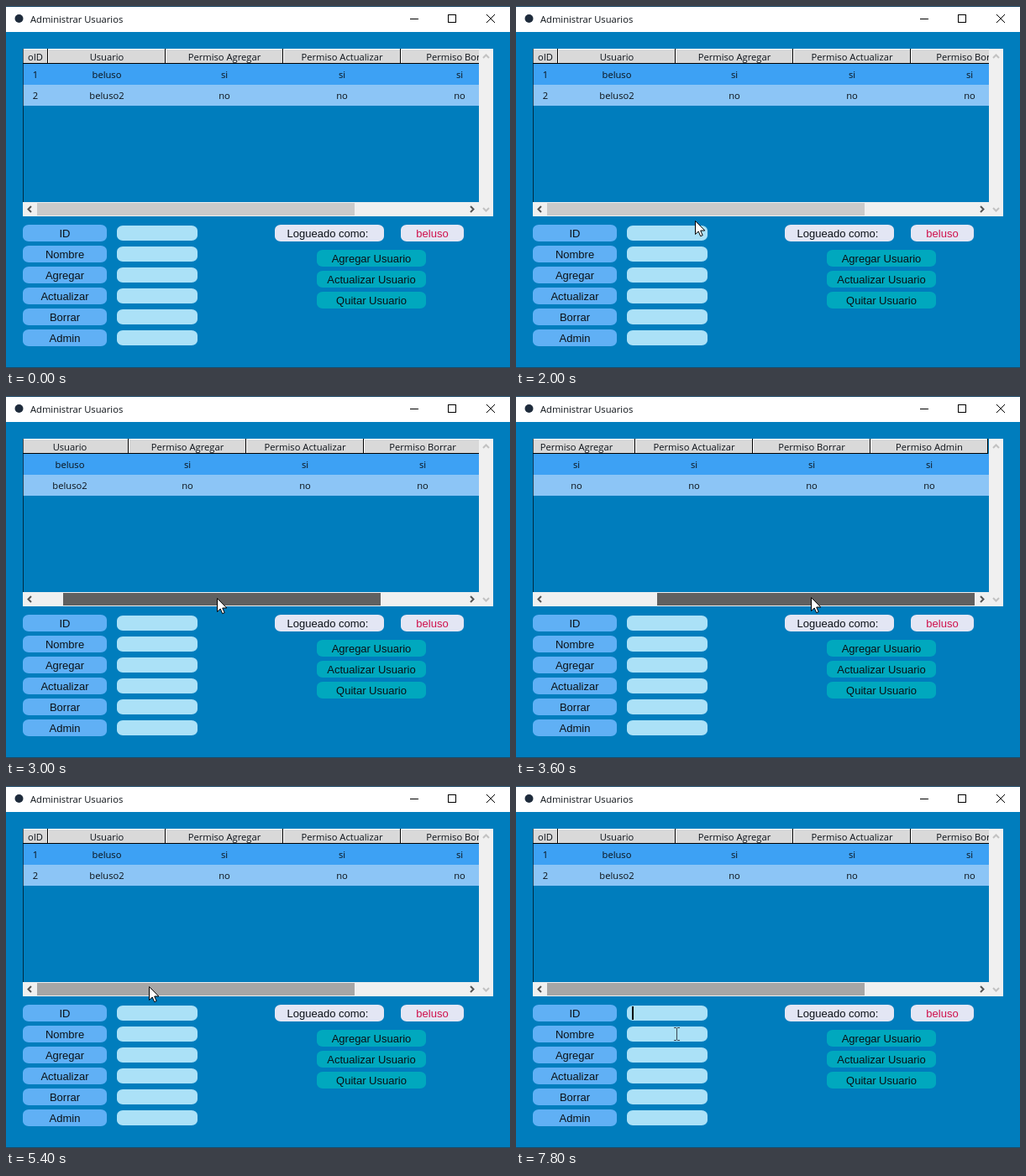
An HTML page that plays this animation: 600x432 px, repeating every 8 s.

```html
<!DOCTYPE html>
<html lang="es">
<head>
<meta charset="utf-8">
<title>Administrar Usuarios</title>
<style>
  html, body { margin: 0; width: 100%; height: 100%; overflow: hidden; background: #007dbd; }
  svg { display: block; width: 100vw; height: 100vh; }
  text { font: 13px "Liberation Sans", Arial, sans-serif; text-anchor: middle; fill: #0b1016; }
  .ui { font: 11.2px "Open Sans", "Noto Sans", sans-serif; }
  .line { fill: none; stroke: #000; }
  .crisp { shape-rendering: crispEdges; }
  .arrow { fill: none; stroke: #555; stroke-width: 2; }
  .off { stroke: #c2c2c2; }

  #pointer, #columns, #thumb, #arrow, #beam, #caret { animation: 8s infinite; }
  #pointer { animation-name: point; }
  #columns { animation-name: scroll; }
  #thumb { animation-name: drag, shade; animation-timing-function: ease, step-end; }
  #arrow, #beam, #caret { animation-timing-function: step-end; }
  #arrow { animation-name: arrow; }
  #beam { animation-name: beam; }
  #caret { animation-name: blink; }

  /* Motion advances in 200 ms steps (2.5% of the loop). */
  @keyframes point {
    0% { transform: translate(160px, 440px); animation-timing-function: step-end; }
    15% { transform: translate(160px, 440px); animation-timing-function: steps(4); }
    25% { transform: translate(213px, 256px); animation-timing-function: steps(2); }
    30% { transform: translate(220px, 242px); animation-timing-function: steps(3); }
    37.5% { transform: translate(251px, 241px); animation-timing-function: steps(3); }
    45% { transform: translate(351px, 240px); animation-timing-function: steps(4); }
    55% { transform: translate(242px, 236px); animation-timing-function: steps(2); }
    60% { transform: translate(200px, 238px); animation-timing-function: steps(3); }
    67.5% { transform: translate(170px, 239px); animation-timing-function: step-end; }
    70% { transform: translate(170px, 239px); animation-timing-function: steps(4); }
    80% { transform: translate(187px, 272px); animation-timing-function: steps(2); }
    85% { transform: translate(187px, 278px); animation-timing-function: step-end; }
    92.5% { transform: translate(187px, 278px); animation-timing-function: steps(2); }
    97.5%, 100% { transform: translate(191px, 296px); }
  }
  @keyframes scroll {
    0% { transform: none; animation-timing-function: step-end; }
    30% { transform: translateX(0); animation-timing-function: steps(3); }
    37.5% { transform: translateX(-44px); animation-timing-function: steps(3); }
    45% { transform: translateX(-188px); animation-timing-function: steps(4); }
    55% { transform: translateX(-36px); animation-timing-function: steps(2); }
    60%, 100% { transform: translateX(0); }
  }
  @keyframes drag {
    0% { transform: none; animation-timing-function: step-end; }
    30% { transform: translateX(0); animation-timing-function: steps(3); }
    37.5% { transform: translateX(31px); animation-timing-function: steps(3); }
    45% { transform: translateX(131px); animation-timing-function: steps(4); }
    55% { transform: translateX(27px); animation-timing-function: steps(2); }
    60%, 100% { transform: translateX(0); }
  }
  @keyframes shade {
    0% { fill: #cacaca; animation-timing-function: step-end; }
    27.5% { fill: #a6a6a6; animation-timing-function: step-end; }
    30% { fill: #606060; animation-timing-function: step-end; }
    62.5%, 100% { fill: #a6a6a6; }
  }
  @keyframes arrow { 0% { opacity: 1; } 77.5%, 100% { opacity: 0; } }
  @keyframes beam { 0% { opacity: 0; } 77.5%, 100% { opacity: 1; } }
  @keyframes blink {
    0% { opacity: 0; }
    80% { opacity: 1; }
    90% { opacity: 0; }
    92.5%, 100% { opacity: 1; }
  }
</style>
</head>
<body>
<svg viewBox="0 0 600 432">
  <clipPath id="view"><rect x="20" y="51" width="543" height="183"/></clipPath>

  <rect width="600" height="432" fill="#007dbd"/>
  <rect width="600" height="31" fill="#fff"/>
  <rect class="crisp" width="600" height="1" fill="#123f5f"/>
  <rect class="crisp" y="431" width="600" height="1" fill="#1c4a68"/>
  <circle cx="15.5" cy="15" r="5" fill="#1f2c3c"/>
  <text class="ui" x="29" y="20" style="text-anchor:start">Administrar Usuarios</text>
  <path class="line crisp" d="M481 15.5h10M526.5 10.5h9v9h-9z"/>
  <path class="line" d="M572 10l10 10m0-10l-10 10"/>

  <g clip-path="url(#view)">
    <rect x="20" y="69" width="543" height="25" fill="#3da1f4"/>
    <rect x="20" y="94" width="543" height="25" fill="#8cc5f6"/>
    <g id="columns"></g>
    <path class="line crisp" d="M20.5 51v183" opacity=".65"/>
  </g>

  <rect x="563" y="51" width="17" height="200" fill="#f0f0f0"/>
  <rect x="20" y="234" width="543" height="17" fill="#f0f0f0"/>
  <rect id="thumb" x="37" y="235" width="378" height="15"/>
  <path class="arrow" d="M30 239l-3.5 3.5 3.5 3.5M553 239l3.5 3.5-3.5 3.5"/>
  <path class="arrow off" d="M568 62l3.5-3.5 3.5 3.5M568 241l3.5 3.5 3.5-3.5"/>

  <g id="form"></g>
  <rect id="caret" class="crisp" x="138" y="263" width="2" height="16"/>

  <g id="pointer">
    <path id="arrow" d="M.5.5V16.5L4.2 13 6.7 18.7 9.2 17.6 6.7 12H11.8Z" fill="#fff" stroke="#000"/>
    <path id="beam" class="crisp" d="M-3 -7.5H0M1 -7.5H4M.5-7V7M-3 7.5H0M1 7.5H4" fill="none" stroke="#3b4650"/>
  </g>
</svg>
<script>
  const byId = id => document.getElementById(id);
  const text = (label, x, y, attrs = "") => `<text x="${x}" y="${y}" ${attrs}>${label}</text>`;
  const pill = (x, y, w, h, fill) =>
    `<rect x="${x}" y="${y}" width="${w}" height="${h}" rx="7" ry="6" fill="${fill}"/>`;
  const badge = (label, x, y, w, fill, attrs) =>
    pill(x, y, w, 20, fill) + text(label, x + w / 2, y + 15, attrs);

  const columns = [
    ["oID", 30, "1", "2"],
    ["Usuario", 140, "beluso", "beluso2"],
    ["Permiso Agregar", 140, "si", "no"],
    ["Permiso Actualizar", 140, "si", "no"],
    ["Permiso Borrar", 140, "si", "no"],
    ["Permiso Admin", 140, "si", "no"]
  ];
  let left = 20;
  byId("columns").innerHTML = columns.map(([title, width, ...cells]) => {
    const center = left + width / 2;
    const header = `<g class="crisp">
      <rect x="${left}" y="51" width="${width}" height="18" fill="#d9d9d9"/>
      <path d="M${left + .5} 68V51.5h${width - 1}" fill="none" stroke="#fff"/>
      <path class="line" d="M${left} 68.5h${width - .5}V51"/></g>`;
    left += width;
    return header + text(title, center, 65, 'class="ui"') +
      cells.map((cell, row) => text(cell, center, 86 + 25 * row, 'class="ui"')).join("");
  }).join("");

  const fields = ["ID", "Nombre", "Agregar", "Actualizar", "Borrar", "Admin"];
  const actions = ["Agregar Usuario", "Actualizar Usuario", "Quitar Usuario"];
  byId("form").innerHTML =
    fields.map((label, i) => badge(label, 20, 261 + 25 * i, 100, "#60b0f5") +
      pill(132, 262 + 25 * i, 96, 18, "#abe1f7")).join("") +
    actions.map((label, i) => badge(label, 370, 291 + 25 * i, 130, "#00a8be")).join("") +
    badge("Logueado como:", 320, 261, 130, "#e3e6f4", 'dx="-2"') +
    badge("beluso", 470, 261, 75, "#e3e6f4", 'style="fill:#d0104c"');
</script>
</body>
</html>
```
